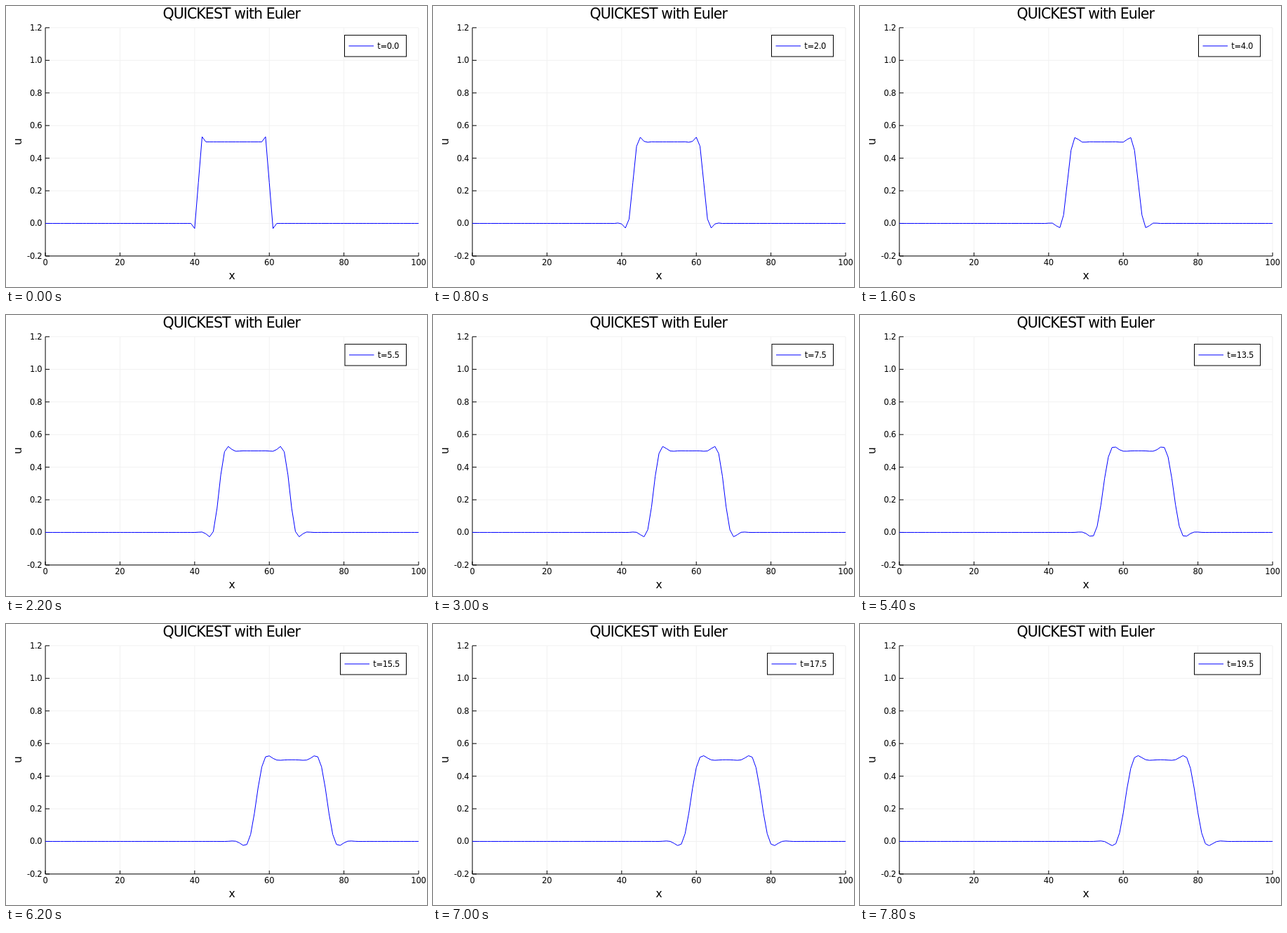
An HTML page that plays this animation: 600 by 400 pixels, repeating every 8 s.

```html
<!DOCTYPE html>
<html lang="en">
<head>
<meta charset="utf-8">
<title>QUICKEST with Euler</title>
<style>
  html, body { margin: 0; width: 100%; height: 100%; overflow: hidden; background: #fff; }
  svg { display: block; width: 600px; height: 400px; }
  text { font: 11.5px "DejaVu Sans", sans-serif; letter-spacing: -0.3px; }
  .title { font-size: 20.5px; letter-spacing: -0.9px; }
  .label { font-size: 15.5px; letter-spacing: 0; }
  path, rect { fill: none; stroke: #000; }
  .grid { stroke: #f1f1f1; }
  .curve { stroke: #00f; stroke-linejoin: round; }
</style>
</head>
<body>
<svg viewBox="0 0 600 400">
  <path class="grid" id="grid"/>
  <path id="axes"/>
  <g id="ticks"></g>
  <text class="title" x="321.2" y="18" text-anchor="middle">QUICKEST with Euler</text>
  <text class="label" x="322" y="389" text-anchor="middle">x</text>
  <text class="label" transform="translate(21.5 193) rotate(-90)" text-anchor="middle">u</text>
  <path class="curve" id="curve"/>
  <rect id="box" y="41.6" height="30.4" style="fill:#fff"/>
  <path class="curve" id="sample"/>
  <text id="time" y="61"></text>
</svg>
<script>
const FRAMES = 40, FRAME_MS = 200, COURANT = 0.5;
const LEFT = 56.1, RIGHT = 588, TOP = 30.9, BOTTOM = 355.9;
const $ = id => document.getElementById(id);
const px = x => LEFT + (RIGHT - LEFT) * x / 100;
const py = u => BOTTOM - (BOTTOM - TOP) * (u + 0.2) / 1.4;

function drawAxes() {
  let grid = '', axes = `M${LEFT} ${TOP}V${BOTTOM}H${RIGHT}`, labels = '';
  for (let x = 0; x <= 100; x += 20) {
    const p = px(x);
    if (x) grid += `M${p} ${TOP}V${BOTTOM}`;
    axes += `M${p} ${BOTTOM}v-5`;
    labels += `<text x="${p - 0.1}" y="369" text-anchor="middle">${x}</text>`;
  }
  for (let k = -1; k <= 6; k++) {
    const p = py(k / 5);
    grid += `M${LEFT} ${p}H${RIGHT}`;
    axes += `M${LEFT} ${p}h6`;
    labels += `<text x="51.3" y="${p + 4}" text-anchor="end">${(k / 5).toFixed(1)}</text>`;
  }
  $('grid').setAttribute('d', grid);
  $('axes').setAttribute('d', axes);
  $('ticks').innerHTML = labels;
}

// One Euler step of u_t + u_x = 0 with QUICKEST face values.
function advance(u) {
  const at = i => u[i] ?? 0;
  const face = i => (at(i) + at(i + 1)) / 2
    - COURANT / 2 * (at(i + 1) - at(i))
    - (1 - COURANT ** 2) / 6 * (at(i + 1) - 2 * at(i) + at(i - 1));
  return u.map((v, i) => v - COURANT * (face(i) - face(i - 1)));
}

const states = [];
let u = Array.from({ length: 101 }, (_, x) => x > 40 && x < 60 ? 0.5 : 0);
for (let n = 0; n < FRAMES; n++) states.push(u = advance(u));

function draw(n) {
  const time = (n / 2).toFixed(1);
  const left = 482.5 - (n >= 20 ? 6.5 : 0) + (n % 2 ? 0.5 : 0);
  $('curve').setAttribute('d', 'M' + states[n].map((v, x) => `${px(x)} ${py(v)}`).join('L'));
  $('box').setAttribute('x', left);
  $('box').setAttribute('width', 570.5 - left);
  $('sample').setAttribute('d', `M${left + 6} 56.9h35.5`);
  $('time').setAttribute('x', left + 46.7);
  $('time').textContent = 't=' + time;
}

function tick() {
  draw(Math.floor(performance.now() / FRAME_MS) % FRAMES);
  requestAnimationFrame(tick);
}

drawAxes();
tick();
</script>
</body>
</html>
```
